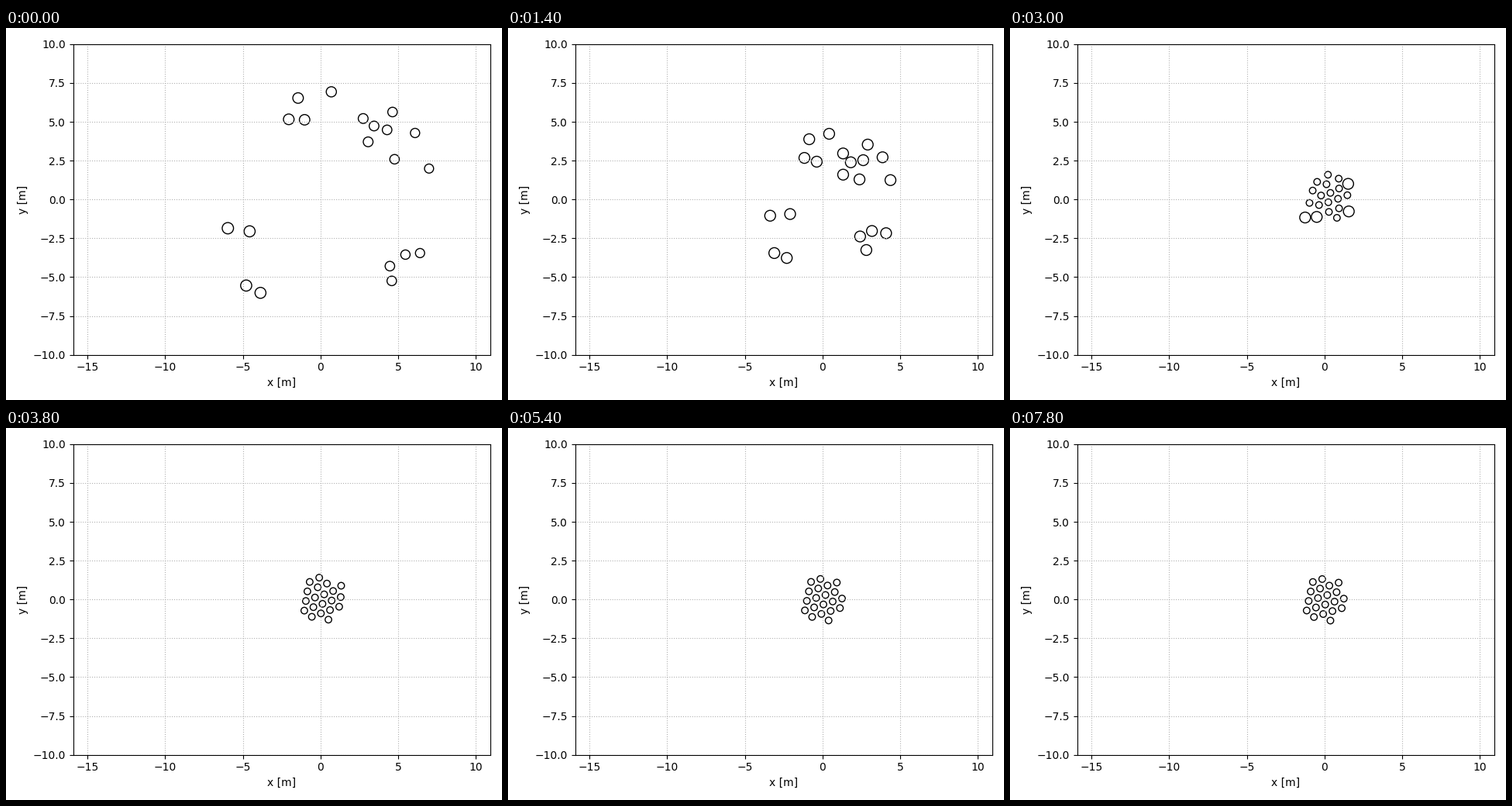
Recreate the animation shown at these times as a matplotlib script. Size 640 by 480 pixels, loop 8 s.

```python
import numpy as np
import matplotlib.pyplot as plt
from matplotlib.animation import FuncAnimation
from matplotlib.patches import Circle

FRAMES, STEP_MS, SUBSTEPS = 40, 200, 10
SPEED = 0.388                    # metres per frame towards the middle
SLOWDOWN = 0.3                   # share of the way left, near the middle
AVOID_RANGE, AVOID = 1.0, 0.2    # gentle sidestep before contact
CONTACT = 0.63                   # closest distance between two discs
R_SMALL, R_CORE, R_BIG, GROWTH = 0.212, 0.27, 0.347, 0.015

# The crowd at the beginning, in metres
START = np.array([
    (-1.45, 6.53), (0.69, 6.93), (-2.05, 5.16), (-1.03, 5.13), (2.74, 5.21),
    (4.63, 5.63), (3.44, 4.73), (4.28, 4.48), (6.08, 4.28), (3.06, 3.71),
    (4.76, 2.59), (6.98, 1.99), (-5.97, -1.85), (-4.57, -2.05),
    (-4.79, -5.54), (-3.87, -6.01), (5.46, -3.55), (6.40, -3.45),
    (4.46, -4.29), (4.58, -5.24)])


def pairs(pos):
    """Unit vectors and distances from every disc to every other."""
    delta = pos[:, None] - pos[None]
    dist = np.hypot(delta[..., 0], delta[..., 1]) + 99 * np.eye(len(pos))
    return delta / dist[..., None], dist


def push_apart(pos, reach, strength):
    unit, dist = pairs(pos)
    force = strength * np.maximum(reach - dist, 0)
    return pos + (unit * force[..., None]).sum(axis=1)


def move(pos):
    for _ in range(SUBSTEPS):
        far = np.hypot(pos[:, 0], pos[:, 1])[:, None]
        pull = np.minimum(SPEED, SLOWDOWN * far) / SUBSTEPS
        pos = pos - pos / np.maximum(far, 1e-6) * pull
        pos = push_apart(pos, AVOID_RANGE, AVOID / SUBSTEPS)
        for _ in range(6):
            pos = push_apart(pos, CONTACT, 0.3)
    return pos


def resize(pos, rad):
    """Discs swell while free and contract as soon as they touch."""
    touching = pairs(pos)[1].min(axis=0) < CONTACT + 0.025
    core = np.hypot(pos[:, 0], pos[:, 1]) < 0.25
    squeezed = np.where(core, R_CORE, R_SMALL)
    return np.where(touching, squeezed, np.minimum(rad + GROWTH, R_BIG))


def simulate():
    pos, rad = START, 0.331 - 0.0055 * START[:, 0]
    states = [(pos, rad)]
    while len(states) < FRAMES:
        pos = move(pos)
        rad = resize(pos, rad)
        states.append((pos, rad))
    return states


STATES = simulate()

fig, ax = plt.subplots(figsize=(6.4, 4.8), dpi=100)
ax.set_xlabel("x [m]")
ax.set_ylabel("y [m]")
ax.set_xlim(-15.9, 10.9)
ax.set_ylim(-10, 10)
ax.grid(linestyle=":")
fig.tight_layout()
fig.subplots_adjust(top=fig.subplotpars.top - 0.3 / 480)
box = ax.get_window_extent()
half = 10 * box.width / box.height
ax.set_xlim(-2.5 - half, -2.5 + half)

discs = [ax.add_patch(Circle(xy, R_BIG, fill=False, ec="black", lw=1))
         for xy in START]


def draw(i):
    for disc, xy, r in zip(discs, *STATES[i]):
        disc.center = xy
        disc.radius = r
    return discs


anim = FuncAnimation(fig, draw, frames=FRAMES, interval=STEP_MS,
                     init_func=lambda: draw(0), repeat=True, repeat_delay=0)
plt.show()
```
